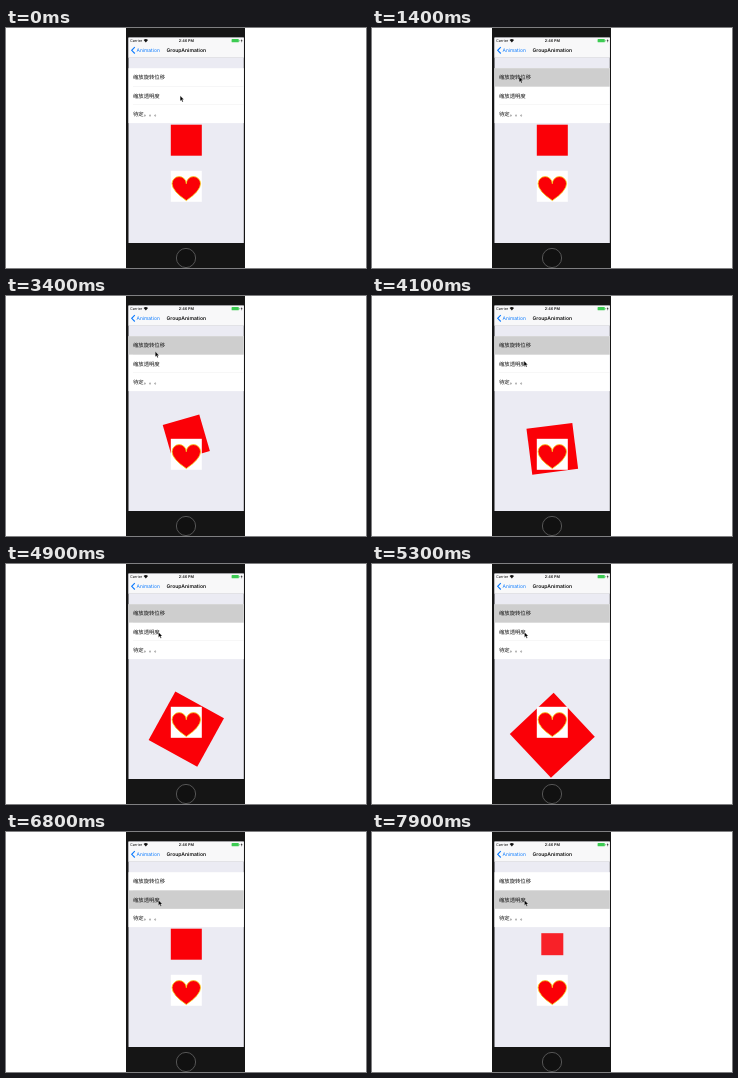
These frames come from a looping animation (360 by 240 pixels, 8000 ms). An HTML page:

```html
<!DOCTYPE html>
<html lang="zh-CN">
<head>
<meta charset="utf-8">
<style>
html, body { margin: 0; width: 100%; height: 100%; overflow: hidden; background: #fff; }
svg { display: block; width: 360px; height: 240px; }
text { font-family: Inter, "Liberation Sans", sans-serif; fill: #111; text-rendering: geometricPrecision; }
.row { font: 5.35px "Noto Sans CJK SC", "Noto Sans CJK", sans-serif; text-spacing-trim: space-all; font-kerning: none; }
</style>
</head>
<body>
<svg viewBox="0 0 360 240">
  <!-- phone -->
  <rect x="120" y="0" width="119" height="240" fill="#151515"/>
  <circle cx="180" cy="230" r="9.6" fill="#111" stroke="#555" stroke-width="1"/>
  <rect x="122.5" y="9.6" width="115.3" height="205.4" fill="#ebebf3"/>

  <!-- status and navigation bars -->
  <rect x="122.5" y="9.6" width="115.3" height="20" fill="#f8f8f9"/>
  <rect x="122.5" y="29.4" width="115.3" height=".4" fill="#c8c8cc"/>
  <text x="124" y="14.1" font-size="3.75">Carrier</text>
  <path d="M137.6 11.9q2.2-1.7 4.4 0l-2.2 2.5z" fill="#111"/>
  <text x="180.3" y="14.2" font-size="3.75" font-weight="600" text-anchor="middle">2:46 PM</text>
  <rect x="225.6" y="11.1" width="7.2" height="3.2" rx=".6" fill="#3ccb52"/>
  <rect x="233.1" y="12" width=".5" height="1.4" fill="#3ccb52"/>
  <path d="M236 10.9l-1.4 2.1h1l-.5 1.8 1.6-2.3h-1z" fill="#222"/>
  <path d="M128.8 19.1l-3.1 3.2 3.1 3.2" fill="none" stroke="#0a7aff" stroke-width="1.1"/>
  <text x="130.5" y="24.2" font-size="4.95" style="fill:#0a7aff">Animation</text>
  <text x="180.3" y="24.2" font-size="5.05" font-weight="600" text-anchor="middle">GroupAnimation</text>

  <!-- table -->
  <rect x="122.5" y="40.2" width="115.3" height="54.9" fill="#fff"/>
  <rect x="127" y="58.2" width="110.8" height=".3" fill="#e2e2e5"/>
  <rect x="127" y="76.6" width="110.8" height=".3" fill="#e2e2e5"/>
  <rect id="mark" x="122.5" width="115.3" height="18.4" fill="#cecece"/>
  <text class="row" x="127" y="51.1">缩放旋转位移</text>
  <text class="row" x="127" y="69.6">缩放透明度</text>
  <text class="row" x="127" y="87.9">待定。。。</text>

  <rect id="box" x="-15.5" y="-15.5" width="31" height="31" fill="#fb0007"/>
  <rect x="164.8" y="142.8" width="31" height="31" fill="#fff"/>
  <path d="M180.3 172.6Q166.04 162.8 166.04 155.7a7.13 7.13 0 0 1 14.26 0a7.13 7.13 0 0 1 14.26 0Q194.56 162.8 180.3 172.6Z"
    fill="#fb0007" stroke="#f7d51d" stroke-width=".8" stroke-linejoin="round"/>
  <path id="arrow" d="M0 0v5.2l1.2-1.1.9 2 .9-.4-.9-1.9h1.6z" fill="#000" stroke="#fff" stroke-width=".25"/>
</svg>
<script>
const LOOP = 8000, CYCLE = 4000;
const FIRST_TAP = 1300, MOVE_START = 1460, SECOND_TAP = 6600, FADE_START = 7340;
const $ = id => document.getElementById(id);
const mark = $('mark'), box = $('box'), arrow = $('arrow');

// time, x, y of the pointer
const path = [[300, 174.2, 67.8], [1150, 147.2, 48.8], [2900, 147.2, 48.8],
  [4000, 152, 64.5], [4500, 152.5, 68.2]];

const mix = (a, b, p) => a + (b - a) * p;

function pointer(t) {
  let a = path[0];
  for (const b of path) {
    if (t < b[0]) {
      if (a === b) break;
      const p = (t - a[0]) / (b[0] - a[0]), e = p * p * (3 - 2 * p);
      return [mix(a[1], b[1], e), mix(a[2], b[2], e)];
    }
    a = b;
  }
  return [a[1], a[2]];
}

function pose(t) {
  const s = { y: 112.2, scale: 1, angle: 0, alpha: 1 };
  if (t >= MOVE_START && t < SECOND_TAP) {
    const p = (t - MOVE_START) % CYCLE / CYCLE;
    s.y += 61.6 * p;
    s.scale = mix(0.5, 2, p);
    s.angle = 1080 * p;
  } else if (t >= FADE_START) {
    const p = (t - FADE_START) / CYCLE;
    s.scale = mix(0.5, 2, p);
    s.alpha = 1 - p;
  }
  return s;
}

function draw(t) {
  const s = pose(t);
  box.setAttribute('transform', `translate(180.3 ${s.y}) rotate(${s.angle}) scale(${s.scale})`);
  box.setAttribute('opacity', s.alpha);
  mark.setAttribute('visibility', t < FIRST_TAP ? 'hidden' : 'visible');
  mark.setAttribute('y', t < SECOND_TAP ? 40.2 : 58.4);
  arrow.setAttribute('transform', `translate(${pointer(t)})`);
}

let start;
function tick(now) {
  start ??= now;
  draw((now - start) % LOOP);
  requestAnimationFrame(tick);
}
draw(0);
requestAnimationFrame(tick);
</script>
</body>
</html>
```
